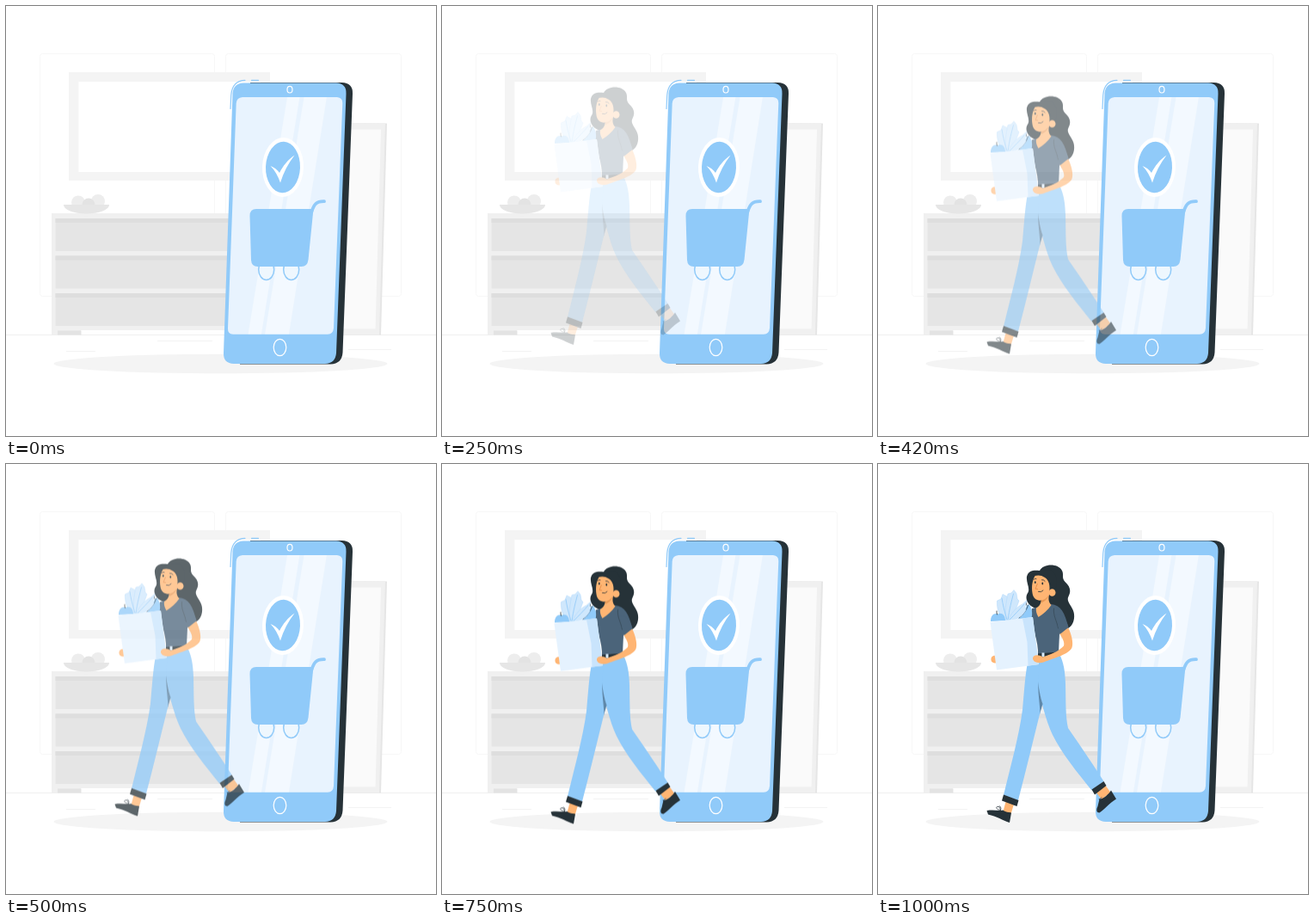
These frames come from a looping animation (500 px wide and 500 px high, 1040 ms). An HTML page:

```html
<!DOCTYPE html>
<html lang="en">
<head>
<meta charset="utf-8">
<title>Shopping delivered</title>
<style>
  html, body { margin: 0; width: 100%; height: 100%; overflow: hidden; background: #fff; }
  svg { display: block; width: 100vw; height: 100vh; }
  .blue { fill: #90caf9; }
  .dark { fill: #263238; }
  .skin { fill: #ffb573; }
  .shirt { fill: #4b647a; }
  .line { fill: none; stroke: #90caf9; stroke-linecap: round; }
  .ink { fill: none; stroke: #263238; stroke-linecap: round; stroke-linejoin: round; }
  .white { fill: none; stroke: #fff; stroke-width: 1.2; }
  /* one second of sliding, then a short rest before the loop */
  .woman { animation: slide 1040ms infinite; }
  @keyframes slide {
    0% { opacity: 0; transform: translateY(-30px); animation-timing-function: cubic-bezier(.36, -.01, .5, 1.38); }
    96.154%, 100% { opacity: 1; transform: none; }
  }
</style>
</head>
<body>
<svg viewBox="0 0 500 500">
  <defs>
    <g id="drawer">
      <rect width="210" height="38" fill="#e5e5e5"/>
      <rect width="210" height="5" fill="#dedede"/>
    </g>
  </defs>

  <g class="room">
    <g fill="none" stroke="#f7f7f7">
      <rect x="39.5" y="55.5" width="203" height="282" rx="3"/>
      <rect x="255.5" y="55.5" width="204" height="282" rx="3"/>
    </g>
    <path d="M0 382.5H500" stroke="#efefef"/>
    <path d="M70 401.5H104M176 389.5H240M398 399.5H448" stroke="#f3f3f3"/>
    <path d="M73 77H307V203H73Z" fill="#f4f4f4"/>
    <path d="M84.500 88H296V193H84.500Z" fill="#fff"/>

    <path d="M380 136L443 136.500L436 382.500H380Z" fill="#e6e6e6"/>
    <path d="M380 136L441 136.500L434 382.500H380Z" fill="#f0f0f0"/>
    <path d="M380 143.500H436L429.500 375.500H380Z" fill="#fafafa"/>

    <path d="M53 241H270V377H87V382.500H53Z" fill="#f0f0f0"/>
    <rect x="60" y="377.500" width="27.500" height="5" fill="#e3e3e3"/>
    <use href="#drawer" x="57.500" y="247"/>
    <use href="#drawer" x="57.500" y="290.500"/>
    <use href="#drawer" x="57.500" y="334"/>

    <circle cx="84" cy="228.500" r="8" fill="#ededed"/>
    <circle cx="107" cy="227" r="8" fill="#ededed"/>
    <circle cx="96" cy="231" r="7.500" fill="#e3e3e3"/>
    <path d="M67 231H120C120 237 108 241.500 93.500 241.500S67 237 67 231Z" fill="#e6e6e6"/>
    <ellipse cx="249.500" cy="416" rx="194" ry="11.300" fill="#f4f4f4"/>
  </g>

  <g class="phone">
    <path class="line" d="M261 119.500L261.700 104C262.500 93 268 86.500 278 86.300M285.500 86.300H293.500" stroke-width="1.200"/>
    <path class="dark" d="M284 89H390.500Q403.500 89.500 403 102L391.500 403Q390.500 416 377.500 416.500H272Z"/>
    <path class="blue" d="M276 89.500H384Q396 90 395.500 102L384 403.500Q383 415.500 371 416H265Q252.500 415.500 253 403.500L263.500 101.500Q264.500 90 276 89.500Z"/>
    <path d="M275 106H385Q391.500 106.500 391.300 113L381 374.500Q380.500 381.500 374 381.700H264Q257.700 381.500 258 375L267.700 113Q268.200 106.500 275 106Z" fill="#e8f3fe"/>
    <path d="M327 106H341.500L297 381.500H281.500ZM346.500 106H373L329 381.500H301Z" fill="#fff" opacity=".45"/>
    <ellipse class="white" cx="330" cy="97.200" rx="3" ry="3.800"/>
    <ellipse class="white" cx="318.500" cy="397" rx="7.300" ry="9.600"/>

    <ellipse cx="322" cy="187.500" rx="24" ry="34.500" fill="#fff" transform="rotate(2 322 187.500)"/>
    <ellipse class="blue" cx="322" cy="187.500" rx="20" ry="29.700" transform="rotate(2 322 187.500)"/>
    <path d="M307.500 186C312 187.500 315.500 190.500 318 194C322 186 328 178.500 335.500 173.500C328 183 322.500 194 319 205.500C316.500 198 312.500 191 307.500 186Z" fill="#fff"/>

    <g stroke="#90caf9" stroke-width="1.500" fill="#eef7fe">
      <ellipse cx="302.700" cy="306.500" rx="9" ry="12"/>
      <ellipse cx="331.700" cy="306.500" rx="9" ry="12"/>
    </g>
    <path class="blue" d="M291 236H357.500L351.500 295Q350.500 303 343.500 303H292.500Q285.500 303 285 295.500L283.500 244Q283.500 236 291 236Z"/>
    <path class="line" d="M355.500 239C358 230.500 361 227 370 227.200" stroke-width="3.800"/>
  </g>

  <g class="woman">
    <!-- hair behind the head -->
    <path class="dark" d="M188 124C192 116 209 115 214 124C216.500 129 213 132 217.500 137C224 143 224.500 148 221.500 154C218.500 160 225 164 227.500 172C230 182 225 191 217 192.500C203 194 196 176 184 168C176 166 170 158 173.500 151C178 145 172 139 173 131C174.500 124 181 123 188 124Z"/>

    <!-- far shoe and trousers -->
    <path class="skin" d="M253 381L264 373L270.500 382L260 390Z"/>
    <path class="dark" d="M257.500 389.500C262 390 268 384 271 379.500L277 389.500C269 394.500 263 402 257.500 405.500C254 405.500 253.500 402 255.500 398Z"/>
    <path class="ink" d="M257 389.500l4 3M260 387.500l-2.500 2.500" stroke-width=".7"/>
    <path class="blue" d="M184 224L211 221C216 231 217.500 241 218 255C218.500 278 218 293 221 307C232 323 246 343 262.500 369L248.500 379.500C232 359 214 337 203 315C195 298 189 273 184 250Z"/>
    <path d="M185.500 249C187 262 189 272 191.500 279L188 291L182 280Z" fill="#5f88aa"/>
    <path class="dark" d="M248.500 378.500L262.500 369L265.500 374L252 384.500Z"/>
    <path class="skin" d="M149 391L158.500 394L154.500 407L145.500 404Z"/>
    <path class="blue" d="M174 231L188 224L186.500 250C185.500 265 188 276 188.500 289C180 323 172 357 163 391L146 385C154 352 164 316 168 286C170 264 171 246 174 231Z"/>
    <path class="dark" d="M146 384.500L163.500 391L161.500 398L144 391.500Z"/>
    <path class="dark" d="M126.500 403C134 401.500 140 403.500 145.500 402.500C149 405.500 152 404.500 155 405.500L153 417C145 414.500 138 409.500 128 407.500Z"/>
    <path class="ink" d="M142.500 402.500C138 402 136 399 139 398.500S142 401 142.500 402.500C144 399 141 396.500 140.500 398" stroke-width=".7"/>

    <!-- torso -->
    <path class="shirt" d="M179 168L201 163C213 164 217 173 221.500 190L211 197.500L210 220L186 222C187 207 179 189 177 176Z"/>
    <path class="ink" d="M204.500 168C203.500 177 208 182 209.500 191" stroke-width=".6" opacity=".65"/>
    <path class="dark" d="M186 220.500L210.500 218.500L211 223L186 225Z"/>
    <path d="M190.500 219.500h3v4.500h-3z" fill="#d9ecfd"/>
    <path class="skin" d="M190 153L199.500 150C197.500 157 198.500 161 201.500 164C197.500 170 192 174.500 186.500 178C184 174 183.500 170 184 167.500C188.500 165 190.500 161 190 153Z"/>
    <path d="M190 157L198.500 153C197 157 193 160.500 189.500 161.500Z" fill="#e89a58"/>

    <!-- face -->
    <path class="skin" d="M184 128C179 134 178.500 143 179.500 150C180.500 157.500 187 160.500 193 157.500C198 155 200 150 201 144L199 130C194 126 188 125 184 128Z"/>
    <path class="dark" d="M182 130C185 124 192 122 202 124C209 129 209 139 206 147L199 149.500C200.500 142 199 135 194 132C190 129 186 129 182 130Z"/>
    <ellipse class="skin" cx="202.500" cy="149.500" rx="4" ry="4.300"/>
    <ellipse class="dark" cx="182.800" cy="137.700" rx=".9" ry="1.400"/>
    <ellipse class="dark" cx="191.300" cy="139" rx=".9" ry="1.400"/>
    <path class="ink" d="M181 134.300q1.500-1.500 3-.8M190.500 134.700q2.500-.4 3.700 1.700M186.500 148.500q3.500 1.200 5.500-1.500" stroke-width=".8"/>
    <path d="M185.500 139L183 145.200L186 145.500" fill="none" stroke="#e58a42" stroke-width=".8"/>

    <!-- groceries -->
    <path class="skin" d="M138 223C133 222 131 225 131.500 228C132 231 135 232 139 231Z"/>
    <path class="blue" d="M160 182C168 178 171 171 173 164L176 163.500C179.500 169 180 175 178 181Z"/>
    <path class="ink" d="M164 179C169 175 173 170 174.500 164M172.500 161v3" stroke-width=".7"/>
    <g fill="#cfe7fc" stroke="#aed7fa" stroke-width=".5">
      <path d="M148 183C140 177 138 167 138.500 159L143 157L145 151.500L150 154L154 160L152 183Z"/>
      <path d="M149 183C147 173 149 160 151 151L155 150L158 146.500L161 150.500L162 157L164 159C161 168 157 176 153 183Z"/>
      <path d="M151 183C154 174 161 166 168 163L173 158.500L171 166L172 170C168 177 161 181 151 183Z"/>
    </g>
    <path class="line" d="M150 181C147 171 145 163 144 156M151 181C153 168 155 160 157.500 151M153 181C159 175 164 170 170 163" stroke-width=".8"/>
    <path class="blue" d="M131 183C131 176 135 173 139 174.500C144 172 148 176 148 182Z"/>
    <path class="ink" d="M138.500 175q-.8-2-.5-4" stroke-width=".8"/>
    <path d="M130.500 184L180 178L187 233L138 239.500Z" fill="#e5f2fe"/>
    <path d="M168 179.500L180 178L187 233L174.500 234.500L173.500 207Z" fill="#c9e4fc"/>

    <!-- near arm -->
    <path class="skin" d="M211 197L221 190C225 198 227.500 208 225.500 213.500C222 221.500 205 225.500 192.500 230.500C186 232.500 179.500 230 180 225.500C181 221.500 187 221.500 191.500 224.500C201 221.500 210 218 216 211.500C217.500 207 214 202 211 197Z"/>
    <path class="shirt" d="M207 176C214 174 218 179 221.500 190L211.500 198Z"/>
  </g>
</svg>
</body>
</html>
```
